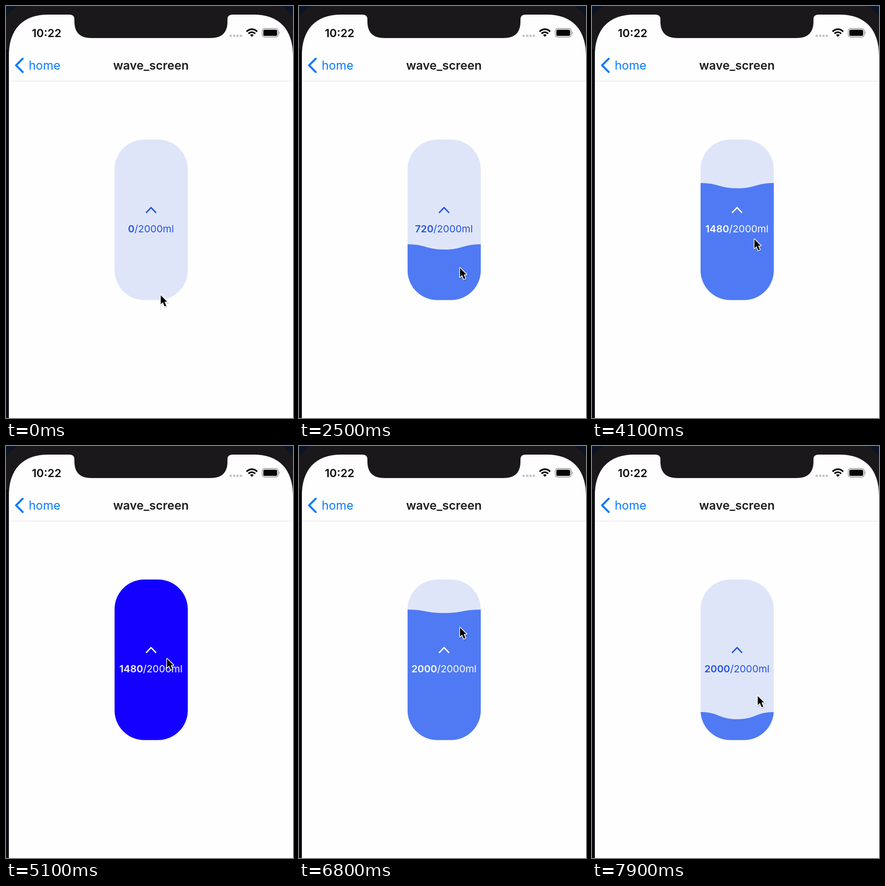
Write an HTML page that moves like this. It is 600 by 861 pixels and loops after 8000 ms.

```html
<!DOCTYPE html>
<html lang="en">
<head>
<meta charset="utf-8">
<title>wave_screen</title>
<style>
  html, body { margin: 0; width: 100%; height: 100%; overflow: hidden; background: #1a181b; }
  svg { display: block; width: 100vw; height: 100vh; }
  text { font-family: Inter, "Open Sans", sans-serif; }
</style>
</head>
<body>
<svg viewBox="0 0 600 861">
  <defs>
    <clipPath id="pill"><rect x="227" y="279" width="153" height="335.5" rx="62"/></clipPath>
    <clipPath id="water"><path id="wave"/></clipPath>
    <g id="label">
      <path d="M293.5 431.5 L303.3 421.3 L313.1 431.5" fill="none" stroke="currentColor" stroke-width="2.8" stroke-linecap="round" stroke-linejoin="round"/>
      <text x="303" y="472.5" font-size="20.7" text-anchor="middle" fill="currentColor"><tspan id="amount" font-weight="600">0</tspan><tspan>/2000ml</tspan></text>
    </g>
  </defs>

  <!-- phone frame and screen -->
  <rect width="600" height="861" fill="#1a181b"/>
  <path d="M0 22 Q10 8 25 0 H0Z M575 0 Q590 8 600 22 V0Z" fill="#0a1424"/>
  <rect y="90" width="6" height="771" fill="#0b0c10"/>
  <path d="M6 861 V104 C6 50 34 18 88 18 H133 Q143 18 143 28 V32 C143 56 155 67 179 67 H427 C451 67 463 56 463 32 V28 Q463 18 473 18 H518 C572 18 600 50 600 104 V861Z" fill="#fefefe"/>

  <!-- status bar -->
  <text x="54" y="65" font-size="23.3" font-weight="600" fill="#0b0b0c">10:22</text>
  <g fill="#c3c3c6">
    <circle cx="469.7" cy="62.3" r="2.5"/><circle cx="477" cy="62.3" r="2.5"/>
    <circle cx="484" cy="62.3" r="2.5"/><circle cx="491" cy="62.3" r="2.5"/>
  </g>
  <g fill="none" stroke="#0b0b0c" stroke-width="3.3">
    <path d="M502.8 53.4 Q514 43.6 525.2 53.4"/>
    <path d="M506.9 57.7 Q514 51.6 521.1 57.7"/>
    <path d="M510.2 60.4 Q514 57.6 517.8 60.4 L514 64.6Z" fill="#0b0b0c" stroke="none"/>
  </g>
  <rect x="535.7" y="47" width="33.4" height="18" rx="5.3" fill="none" stroke="#8f8f92" stroke-width="1.5"/>
  <rect x="538" y="49.4" width="28.8" height="13.2" rx="3.2" fill="#050505"/>
  <path d="M570.7 53 Q573.6 56 570.7 59Z" fill="#8f8f92"/>

  <!-- navigation bar -->
  <path d="M35 110 L21 124 L35 138" fill="none" stroke="#0a7aff" stroke-width="4" stroke-linecap="round" stroke-linejoin="round"/>
  <text x="47.5" y="133" font-size="25" fill="#0a7aff">home</text>
  <text x="303" y="132.5" font-size="25" font-weight="600" text-anchor="middle" fill="#1c1c1e">wave_screen</text>
  <rect x="6" y="156.5" width="594" height="1" fill="#e4e4e6"/>

  <!-- water gauge -->
  <g clip-path="url(#pill)">
    <rect x="227" y="279" width="153" height="336" fill="#dfe5f9"/>
    <use href="#label" color="#2352e0"/>
    <g clip-path="url(#water)">
      <rect id="fill" x="227" y="279" width="153" height="336" fill="#4f7af3"/>
      <use href="#label" color="#fafbff"/>
    </g>
  </g>

  <g id="cursor">
    <path d="M1.5 3.5 V22.3 L5.9 18.2 L9.6 26.8 L13 25.4 L9.4 16.9 H15Z" transform="translate(1 2)" fill="#000" stroke="#000" stroke-width="3" opacity=".14"/>
    <path d="M1.5 3.5 V22.3 L5.9 18.2 L9.6 26.8 L13 25.4 L9.4 16.9 H15Z" fill="#000" stroke="#fff" stroke-width="3" stroke-linejoin="round" paint-order="stroke"/>
  </g>
</svg>
<script>
const LOOP = 8000, STEP = 100, TOP = 279;
const el = id => document.getElementById(id);
const wave = el('wave'), fill = el('fill'), amount = el('amount'), cursor = el('cursor');

// Each key is [time, value, ...].
const pointer = [
  [0, 322, 601], [300, 310, 470], [600, 310, 470], [900, 312, 568],
  [1100, 314, 525], [1500, 322, 491], [1800, 323, 491], [2300, 334, 548],
  [2500, 335, 544], [3200, 336, 460], [3500, 336, 460], [4100, 338, 484],
  [4400, 336, 504], [5100, 335, 441], [5600, 335, 309], [6000, 335, 330],
  [6500, 335, 334], [6800, 335, 376], [7700, 344, 512], [7900, 345, 519]
];
const level = [
  [0, 616], [900, 616], [1100, 549], [1500, 498], [2500, 498], [3200, 370],
  [4400, 370], [5000, TOP], [6500, TOP], [6800, 342], [7700, 546], [7900, 556]
];
const swell = [
  [0, 6], [1100, 8], [1500, 6], [2000, 11], [4100, 11], [5000, 6],
  [6500, 4], [6800, 7], [7900, 15]
];
const readings = [[0, 0], [1700, 720], [3500, 1480], [5700, 2000]];

// Monotone cubic through the keys: no overshoot, still at turning points.
function sample(keys, t, k = 1) {
  const last = keys.length - 1;
  if (t >= keys[last][0]) return keys[last][k];
  const i = keys.findIndex(key => key[0] > t) - 1;
  const slope = j => (keys[j + 1][k] - keys[j][k]) / (keys[j + 1][0] - keys[j][0]);
  const tangent = j => {
    if (j < 1 || j >= last) return 0;
    const a = slope(j - 1), b = slope(j);
    return a * b > 0 ? 2 * a * b / (a + b) : 0;
  };
  const span = keys[i + 1][0] - keys[i][0], u = (t - keys[i][0]) / span;
  const ease = u * u * (3 - 2 * u);
  return keys[i][k] * (1 - ease) + keys[i + 1][k] * ease
    + span * u * (1 - u) * ((1 - u) * tangent(i) - u * tangent(i + 1));
}

function draw(t) {
  const y = sample(level, t), mid = y + sample(swell, t);
  const full = y <= TOP;
  wave.setAttribute('d', full
    ? 'M227 270 H380 V620 H227Z'
    : `M227 ${y} C265 ${y} 265 ${mid} 303.5 ${mid} C342 ${mid} 342 ${y} 380 ${y} V620 H227Z`);
  fill.setAttribute('fill', full ? '#1400ff' : '#4f7af3');
  amount.textContent = readings.filter(r => r[0] <= t).pop()[1];
  cursor.setAttribute('transform', `translate(${sample(pointer, t, 1)} ${sample(pointer, t, 2)})`);
}

const start = performance.now();
function tick() {
  const t = (performance.now() - start) % LOOP;
  draw(Math.floor(t / STEP) * STEP);
  requestAnimationFrame(tick);
}
tick();
</script>
</body>
</html>
```
